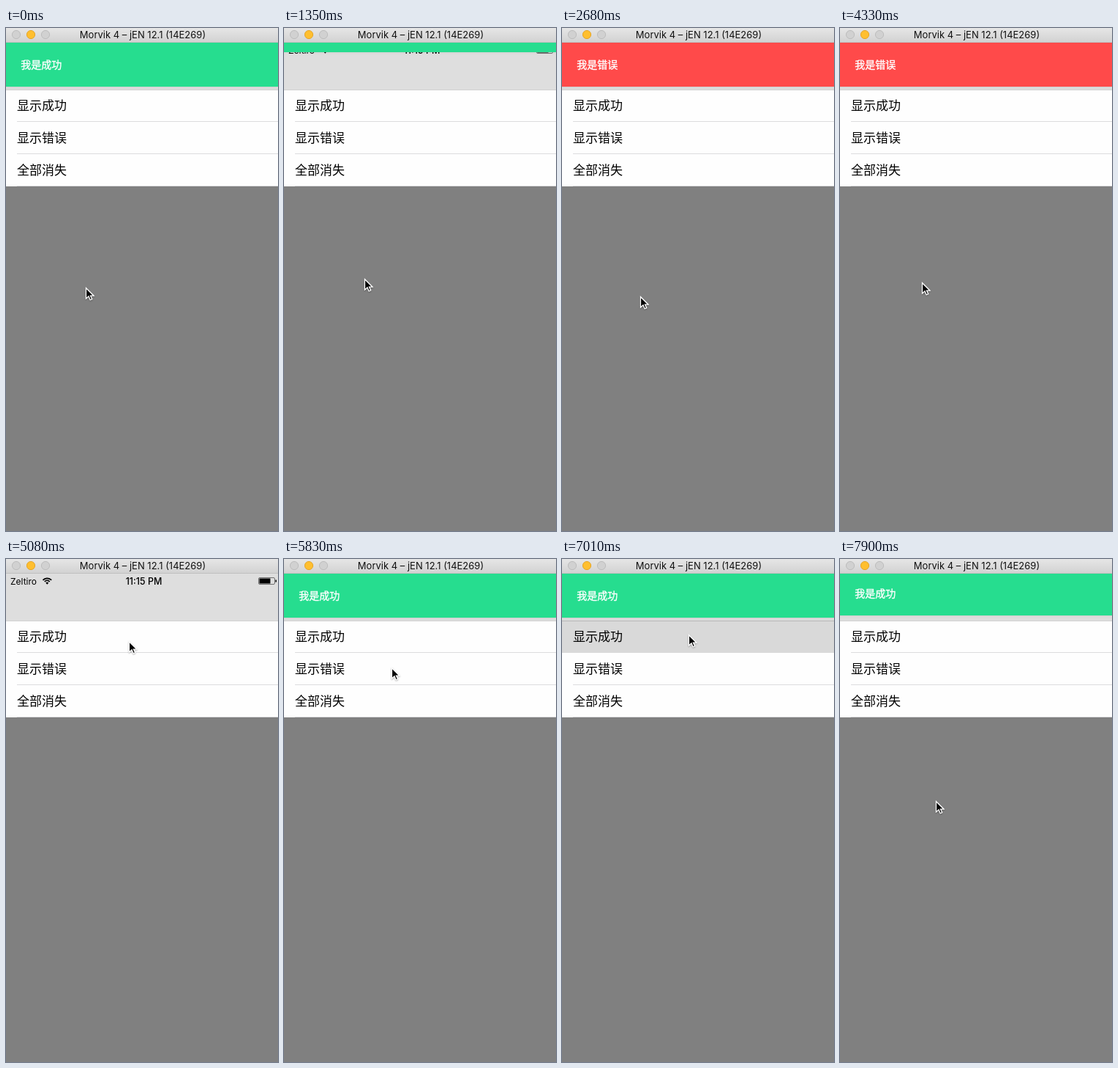
An HTML page with a canvas for the animation above (8 s loop, 372 by 686 pixels).

```html
<!DOCTYPE html>
<html lang="zh-CN">
<head>
<meta charset="utf-8">
<style>
html, body { margin: 0; width: 100%; height: 100%; overflow: hidden; background: #808080; }
canvas { display: block; }
</style>
</head>
<body>
<canvas id="stage" width="372" height="686"></canvas>
<script>
const ctx = document.getElementById('stage').getContext('2d');
const WIDTH = 372, LOOP = 8000;
const BEAT = 148.8; // the screen refreshes once per beat; all times below are in beats
const LATIN = 'Inter, sans-serif';
const CJK = '"Noto Sans CJK SC", "Noto Sans CJK", sans-serif';

const success = { label: '我是成功', color: '#26dd8f' };
const failure = { label: '我是错误', color: '#ff4a4a' };
const toasts = [
  { ...success, show: -9, hide: 6.5 },
  { ...failure, show: 16, hide: 30.5 },
  { ...success, show: 37, hide: 52.5 }
];
const taps = [
  { beat: 16, row: 1 }, { beat: 37, row: 0 }, { beat: 41, row: 1 }, { beat: 47, row: 0 }
];
const pointerStart = { x: 109, y: 354 };
const pointerMoves = [
  { from: 8.3, to: 13, x: 130, y: 146 },
  { from: 16, to: 18, x: 107, y: 366 },
  { from: 28, to: 34, x: 168, y: 112 },
  { from: 37.5, to: 39, x: 147, y: 148 },
  { from: 41.5, to: 45, x: 173, y: 103 },
  { from: 47.5, to: 50, x: 131, y: 330 }
];

// Eased progress from 0 to 1 between two beats
function progress(beat, from, to) {
  const p = Math.min(1, Math.max(0, (beat - from) / (to - from)));
  return p * p * (3 - 2 * p);
}

function rect(x, y, w, h, color) {
  ctx.fillStyle = color;
  ctx.fillRect(x, y, w, h);
}

function text(str, x, y, font, color = '#000', align = 'left') {
  ctx.font = font;
  ctx.fillStyle = color;
  ctx.textAlign = align;
  ctx.fillText(str, x, y);
}

function drawStatusBar() {
  rect(0, 20, WIDTH, 64, '#dedede');
  text('Zeltiro', 6, 34.5, '12px ' + LATIN);
  text('11:15 PM', 188.5, 34.5, '500 12.5px ' + LATIN, '#000', 'center');

  const wifiArc = (y, r) => ctx.arc(56.3, y, r, -Math.PI * 0.77, -Math.PI * 0.23);
  ctx.strokeStyle = '#000';
  ctx.lineWidth = 1.7;
  for (const r of [4.6, 7.7]) {
    ctx.beginPath();
    wifiArc(34, r);
    ctx.stroke();
  }
  ctx.beginPath();
  ctx.moveTo(56.3, 34.7);
  wifiArc(34.2, 2.6);
  ctx.fill();

  ctx.strokeStyle = '#555';
  ctx.lineWidth = 0.8;
  ctx.beginPath();
  ctx.roundRect(345.5, 25.5, 22, 9, 1.5);
  ctx.stroke();
  rect(346.5, 26.5, 15, 7, '#000');
  rect(368.5, 28.5, 1.5, 3, '#000');
}

function drawTable(beat) {
  rect(0, 84, WIDTH, 132, '#fefefe');
  rect(0, 84, WIDTH, 1, '#d2d2d2');
  ['显示成功', '显示错误', '全部消失'].forEach((label, i) => {
    const top = 84 + 44 * i;
    rect(15, top + 43, WIDTH - 15, 1, '#dcdcde');
    const tap = taps.find(({ beat: b, row }) => row === i && beat >= b && beat < b + 2);
    if (tap) {
      ctx.globalAlpha = 1 - progress(beat, tap.beat, tap.beat + 2);
      rect(0, top, WIDTH, 44, '#d9d9d9');
      rect(0, top, WIDTH, 1, '#b8b8b8');
      ctx.globalAlpha = 1;
    }
    text(label, 15, top + 28, '17px ' + CJK);
  });
}

function drawToast(beat, { label, color, show, hide }) {
  const shown = progress(beat, show, show + 2) - progress(beat, hide, hide + 3.6);
  const height = Math.round(60 * shown);
  if (height <= 0) return;
  const y = height - 40;
  ctx.save();
  ctx.shadowColor = 'rgba(0,0,0,.12)';
  ctx.shadowBlur = 3;
  rect(0, y, WIDTH, 60, color);
  ctx.restore();
  text(label, 20.3, y + 35, '500 14px ' + CJK, '#fff');
  // A hairline stroke gives the label its medium weight
  ctx.strokeStyle = '#fff';
  ctx.lineWidth = 0.35;
  ctx.strokeText(label, 20.3, y + 35);
}

function drawTitleBar() {
  const shade = ctx.createLinearGradient(0, 0, 0, 20);
  shade.addColorStop(0, '#e6e6e6');
  shade.addColorStop(1, '#d1d1d1');
  rect(0, 0, WIDTH, 20, shade);
  rect(0, 19, WIDTH, 1, '#c0c0c0');
  ctx.lineWidth = 1;
  for (let i = 0; i < 3; i++) {
    ctx.beginPath();
    ctx.arc(14 + 20 * i, 9, 5.6, 0, Math.PI * 2);
    ctx.fillStyle = i === 1 ? '#ffbf2f' : '#d1d1d1';
    ctx.strokeStyle = i === 1 ? '#e5a528' : '#bdbdbd';
    ctx.fill();
    ctx.stroke();
  }
  text('Morvik 4 – jEN 12.1 (14E269)', 187, 14, '13px ' + LATIN, '#111', 'center');
}

const arrow = new Path2D('M.5 .8V15L4 11.8L6.2 16.8L8.6 15.8L6.4 11H10.8Z');

function drawPointer(beat) {
  let { x, y } = pointerStart;
  for (const move of pointerMoves) {
    const p = progress(beat, move.from, move.to);
    x += (move.x - x) * p;
    y += (move.y - y) * p;
  }
  ctx.save();
  ctx.translate(Math.round(x), Math.round(y));
  ctx.shadowColor = 'rgba(0,0,0,.4)';
  ctx.shadowBlur = 2;
  ctx.shadowOffsetY = 1;
  ctx.lineWidth = 1.2;
  ctx.strokeStyle = '#fff';
  ctx.stroke(arrow);
  ctx.shadowColor = 'transparent';
  ctx.fillStyle = '#000';
  ctx.fill(arrow);
  ctx.stroke(arrow);
  ctx.restore();
}

function draw(time) {
  const beat = Math.floor(time % LOOP / BEAT);
  rect(0, 0, WIDTH, 686, '#808080');
  drawStatusBar();
  drawTable(beat);
  toasts.forEach(toast => drawToast(beat, toast));
  drawTitleBar();
  drawPointer(beat);
}

let origin;
function loop(now) {
  origin ??= now;
  draw(now - origin);
  requestAnimationFrame(loop);
}
draw(0);
requestAnimationFrame(loop);
</script>
</body>
</html>
```
